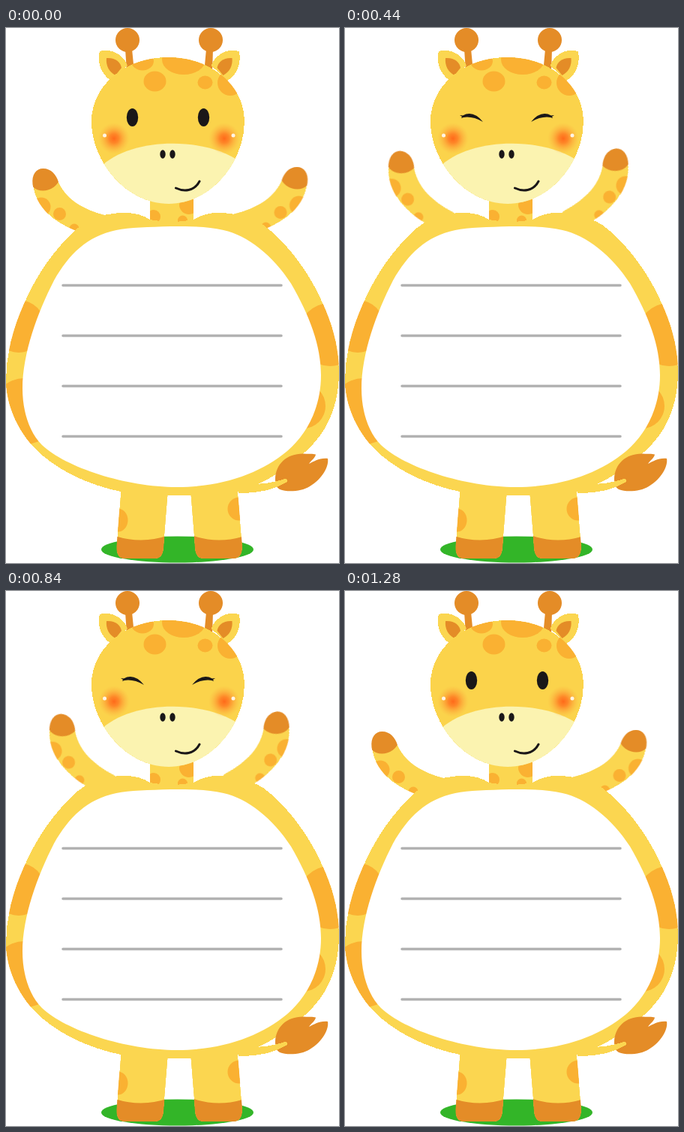
These frames come from a looping animation (444x712 px, 1320 ms). An HTML page:

```html
<!DOCTYPE html>
<html lang="en">
<head>
<meta charset="utf-8">
<title>Waving giraffe</title>
<style>
  html, body { margin: 0; width: 100%; height: 100%; overflow: hidden; background: #fff; }
  svg { display: block; width: 100vw; height: 100vh; }

  .skin { fill: #fbd650; }
  .face { fill: #fbd34b; }
  .spot { fill: #fab132; }
  .hoof { fill: #e48c27; }
  .ink  { fill: #1a1718; }
  .skin, .face { shape-rendering: crispEdges; }

  .arm, .eyes { animation: 1320ms -1ms infinite; }
  .left  { transform-origin: 158px 288px; animation-name: wave-left; }
  .right { transform-origin: 280px 287px; animation-name: wave-right; }
  .eyes  { animation-timing-function: step-end; }
  .open  { animation-name: open; }
  .shut  { animation-name: shut; }

  /* 33 ticks of 40 ms; the right arm rests two ticks either side of the top */
  @keyframes wave-left {
    0% { transform: rotate(0deg); animation-timing-function: steps(16); }
    48.4848% { transform: rotate(20deg); animation-timing-function: steps(16); }
    96.9697%, 100% { transform: rotate(0deg); }
  }
  @keyframes wave-right {
    0% { transform: rotate(0deg); animation-timing-function: steps(14); }
    42.4242% { transform: rotate(-18.7deg); }
    54.5455% { transform: rotate(-18.7deg); animation-timing-function: steps(14); }
    96.9697%, 100% { transform: rotate(0deg); }
  }
  @keyframes open {
    0% { opacity: 1; }
    27.2727% { opacity: 0; }
    81.8182%, 100% { opacity: 1; }
  }
  @keyframes shut {
    0% { opacity: 0; }
    27.2727% { opacity: 1; }
    81.8182%, 100% { opacity: 0; }
  }
</style>
</head>
<body>
<svg viewBox="0 0 444 712">
  <defs>
    <path id="head" d="M216 39C158 39 114 77 114 124C114 178 160 234 217 234C274 234 318 178 318 124C318 77 274 39 216 39Z"/>
    <path id="body" d="M158 246C172 246 183 249 192 255Q221 261 250 255C262 248 275 245 288 246C310 247 328 253 343 262C376 286 408 330 426 375C438 403 444 432 444 458C444 496 432 530 410 553C384 581 348 606 308 617C270 623 195 625 153 617C109 608 66 588 37 558C14 533 0 500 0 468C0 436 9 400 24 367C40 330 64 294 96 266C113 252 135 246 158 246Z"/>
    <path id="limb" d="M35.500 208C34 195 40 187 49.500 187C60 187 67 195 70 205C79 225 98 241 136 250L150 264V290L110 275C75 266 41 246 35.500 208Z"/>
    <path id="legL" d="M154 605L147.500 690Q147 706 158 706H199Q209 706 210 692L217 605Z"/>
    <path id="legR" d="M245 605L252 692Q253 706 263 706H303Q315 706 315 690L308 605Z"/>
    <clipPath id="inHead"><use href="#head"/></clipPath>
    <clipPath id="inBody"><use href="#body"/></clipPath>
    <clipPath id="inLimb"><use href="#limb"/></clipPath>
    <clipPath id="inLegL"><use href="#legL"/></clipPath>
    <clipPath id="inLegR"><use href="#legR"/></clipPath>
    <clipPath id="inNeck"><path d="M192 220H250V275H192Z"/></clipPath>

    <radialGradient id="blush">
      <stop offset="0" stop-color="#ff6a1a"/>
      <stop offset=".3" stop-color="#ff7a22" stop-opacity=".85"/>
      <stop offset="1" stop-color="#fbb040" stop-opacity="0"/>
    </radialGradient>

    <g id="arm" clip-path="url(#inLimb)">
      <use href="#limb" class="skin"/>
      <ellipse cx="52" cy="200.500" rx="20" ry="15.500" transform="rotate(-18 52 200.500)" class="hoof"/>
      <g class="spot">
        <circle cx="47" cy="238" r="12.500"/>
        <circle cx="71.500" cy="247.500" r="8.500"/>
        <circle cx="91" cy="267" r="6.500"/>
      </g>
    </g>
    <g id="ear">
      <path class="skin" d="M125 31C140 26 157 36 162 50L140 70C127 62 121 45 125 31Z"/>
      <path class="hoof" d="M134 40C145 39 153 45 154 53L146 63C137 58 133 50 134 40Z"/>
    </g>
    <path id="lid" d="M153 116L157 116.500Q171 109 184 125Q170 117 158 119L155 120L156 118Z"/>
  </defs>

  <ellipse cx="228.500" cy="694" rx="101.500" ry="17.500" fill="#33b528"/>

  <g clip-path="url(#inLegL)">
    <use href="#legL" class="skin"/>
    <ellipse cx="149" cy="655" rx="13.500" ry="15.500" class="spot"/>
    <path class="hoof" d="M140 674Q180 689 220 674V712H140Z"/>
  </g>
  <g clip-path="url(#inLegR)">
    <use href="#legR" class="skin"/>
    <circle cx="311" cy="640" r="15.500" class="spot"/>
    <path class="hoof" d="M244 674Q284 689 324 674V712H244Z"/>
  </g>

  <g clip-path="url(#inNeck)">
    <path class="skin" d="M192 220H250V275H192Z"/>
    <g class="spot">
      <circle cx="197" cy="251" r="9"/>
      <circle cx="244" cy="235" r="13"/>
      <circle cx="235.500" cy="256" r="6.500"/>
    </g>
  </g>

  <g class="arm left"><use href="#arm"/></g>
  <g class="arm right"><use href="#arm" transform="translate(437.5 -2) scale(-1 1)"/></g>

  <use href="#body" class="skin"/>
  <g class="spot" clip-path="url(#inBody)">
    <circle cx="17" cy="397" r="35"/>
    <circle cx="25" cy="510" r="44"/>
    <circle cx="432" cy="408" r="42"/>
    <circle cx="396" cy="503" r="30"/>
  </g>
  <path fill="#fff" d="M220 264C190 265 165 265 147 269C108 277 84 301 64 336C42 379 22 433 22 480C22 508 30 537 48 555C80 585 160 611 228 611C290 611 340 592 375 563C402 540 420 504 420 462C420 423 405 383 380 340C356 303 322 276 290 269C268 264 245 264 220 264Z"/>
  <path d="M76 342.500H367M76 409.500H367M76 476.500H367M76 543.500H367" stroke="#b2b2b2" stroke-width="3.500" stroke-linecap="round"/>

  <path class="hoof" d="M359 601C359 580 375 566 397 566.500C404 567 409 566 413 567.500C412 573 407 575 404 580C411 577 417 572 429 573C431 583 422 600 405 610C394 617 375 618 365 614C360 611 359 606 359 601Z"/>
  <path class="skin" d="M310 607Q345 609 372 600Q378 601 373 605Q350 619 310 619Z"/>

  <g class="hoof">
    <circle cx="162" cy="16" r="16"/>
    <circle cx="273" cy="16" r="16"/>
    <path d="M159 28H168L171 58H161ZM267 28H276L275 60H264Z"/>
  </g>
  <use href="#ear"/>
  <use href="#ear" transform="translate(435.5) scale(-1 1)"/>

  <use href="#head" class="face"/>
  <g clip-path="url(#inHead)">
    <g class="spot">
      <ellipse cx="182" cy="44" rx="15" ry="12.500"/>
      <ellipse cx="237" cy="42" rx="29" ry="20"/>
      <ellipse cx="198.500" cy="71" rx="15" ry="13.500"/>
      <ellipse cx="265.500" cy="72.500" rx="10" ry="9"/>
      <circle cx="299" cy="73" r="17"/>
    </g>
    <path fill="#fbf3b0" d="M125 186C165 145 265 144 312 178V240H125Z"/>
    <g fill="url(#blush)">
      <circle cx="144" cy="147" r="21"/>
      <circle cx="291" cy="147" r="21"/>
    </g>
  </g>
  <g fill="#fff5e6">
    <circle cx="131.500" cy="143" r="2.500"/>
    <circle cx="303" cy="143" r="2.500"/>
  </g>

  <g class="ink">
    <ellipse cx="209" cy="168" rx="3.700" ry="5.700"/>
    <ellipse cx="222" cy="168" rx="3.700" ry="5.700"/>
    <g class="eyes open">
      <ellipse cx="168.500" cy="119" rx="7.700" ry="12"/>
      <ellipse cx="263.500" cy="119" rx="7.700" ry="12"/>
    </g>
    <g class="eyes shut">
      <use href="#lid"/>
      <use href="#lid" transform="translate(432) scale(-1 1)"/>
    </g>
  </g>
  <path d="M226.500 213C237 218 251 217.500 258 204" fill="none" stroke="#1a1718" stroke-width="3" stroke-linecap="round"/>
</svg>
</body>
</html>
```
